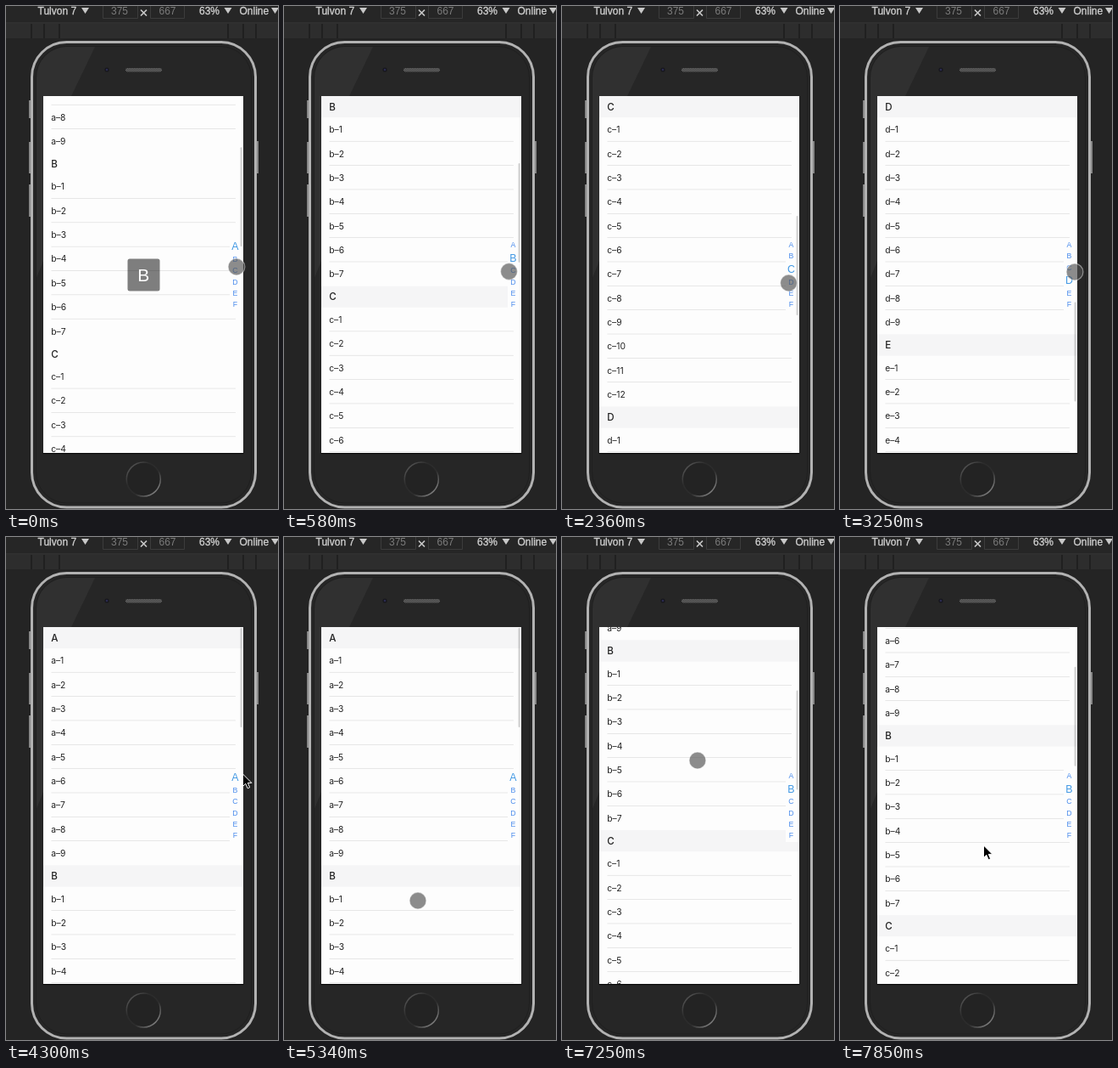
These frames come from a looping animation (321x592 px, 8000 ms). An HTML page:

```html
<!DOCTYPE html>
<html lang="en">
<head>
<meta charset="utf-8">
<title>Index list</title>
<style>
  html, body { margin: 0; width: 100%; height: 100%; overflow: hidden; background: #242424; }
  svg { display: block; }
  .bar text { font: 12px "Liberation Sans", Arial, sans-serif; fill: #d2d2d2; stroke: #d2d2d2; stroke-width: .3px; }
  .bar .dim { fill: #7c7c7c; stroke: none; text-anchor: middle; }
  .bar path { fill: #c8c8c8; }
  .row { font: 10.3px Inter, sans-serif; fill: #222; }
  .head { font: 500 11.6px Inter, sans-serif; fill: #222; }
  .mark { font: 8.8px "Liberation Sans", Arial, sans-serif; fill: #4b8cec; text-anchor: middle; }
  .mark.on { font-size: 12.4px; fill: #4299e4; }
  #letter { font: 21px "Liberation Sans", Arial, sans-serif; fill: #fff; text-anchor: middle; }
</style>
</head>
<body>
<svg width="321" height="592" viewBox="0 0 321 592">
  <defs>
    <linearGradient id="ring" x1="0" y1="0" x2="1" y2="1">
      <stop offset="0" stop-color="#666"/>
      <stop offset=".35" stop-color="#2c2c2c"/>
      <stop offset=".6" stop-color="#2c2c2c"/>
      <stop offset="1" stop-color="#a4a4a4"/>
    </linearGradient>
    <pattern id="mesh" width="2" height="2" patternUnits="userSpaceOnUse">
      <path d="M0 0h2v2h-2z" fill="#3c3c3c"/>
      <path d="M0 0h1v1h-1zM1 1h1v1h-1z" fill="#6a6a6a"/>
    </pattern>
    <clipPath id="body"><rect x="36" y="48" width="253" height="536" rx="36"/></clipPath>
  </defs>

  <rect width="321" height="592" fill="#242424"/>
  <g class="bar">
    <rect width="321" height="20" fill="#262626"/>
    <rect y="19.5" width="321" height="1" fill="#3b3b3b"/>
    <rect y="21" width="321" height="17" fill="#2d2d2d"/>
    <path d="M30 21v17M45 21v17M63 21v17M262 21v17M280 21v17M295 21v17" style="stroke:#1d1d1d;stroke-width:1.5"/>
    <path d="M114.5 -1v15.500h41v-15.500M170.500 -1v15.500h40v-15.500" style="fill:none;stroke:#3c3c3c"/>
    <text x="37.5" y="10">Tulvon 7</text>
    <text class="dim" x="134" y="10">375</text>
    <text class="dim" x="190.5" y="10">667</text>
    <path d="M159 4.500l7 7M166 4.500l-7 7" style="stroke:#c8c8c8;stroke-width:1.7"/>
    <text x="228" y="10">63%</text>
    <text x="275.5" y="10">Online</text>
    <path d="M89 2h9l-4.500 7zM257.500 2h9l-4.500 7zM313 2h9l-4.500 7z"/>
  </g>

  <path d="M27 111h3v21h-3zM27 160h3v37h-3zM27 210h3v38h-3zM295 159h3v38h-3z" fill="#888"/>
  <rect x="30.500" y="42.500" width="264" height="547.500" rx="41" fill="#262626" stroke="#b2b2b2" stroke-width="3"/>
  <rect x="35.500" y="47.500" width="254" height="537.500" rx="36.500" fill="none" stroke="#1f1f1f"/>
  <path d="M36 48H105L77 106H44V300L36 320z" fill="#303030" clip-path="url(#body)"/>
  <circle cx="119" cy="75" r="2.600" fill="#17171d"/>
  <circle cx="119" cy="75" r="1.300" fill="#2b2b50"/>
  <rect x="141" y="73" width="43" height="4.500" rx="2.200" fill="url(#mesh)"/>
  <circle cx="162.300" cy="557" r="20" fill="#232323" stroke="url(#ring)" stroke-width="1.500"/>
  <rect x="43.500" y="526" width="237" height="1.200" fill="#0c0c0c"/>

  <svg x="44" y="106" width="236" height="420">
    <rect width="236" height="420" fill="#fdfdfd"/>
    <g id="list"></g>
    <rect x="220" y="167" width="16" height="86" fill="#fdfdfd"/>
    <g id="marks"></g>
    <rect id="thumb" x="232.500" width="2.200" height="117" rx="1.100" fill-opacity=".17"/>
    <g id="popup">
      <rect x="99.500" y="191.500" width="38" height="38" rx="2.500" fill-opacity=".5"/>
      <text id="letter" x="118.300" y="218"></text>
    </g>
  </svg>

  <circle id="touch" r="9.900" fill="#505050" fill-opacity=".65" stroke="#fff" stroke-opacity=".45" stroke-width="1.200"/>
  <path id="arrow" d="M0 0V14.500L3.300 11.300 5.700 16.800 8.100 15.700 5.800 10.400H10.400z" stroke="#fff"/>
</svg>

<script>
const LOOP = 8000, STEP = 148.2, LEAD = 12, LAST = 53;
const ROW = 28.35, HEAD = 25.2, VIEW = 420;
const NAMES = "ABCDEF", COUNTS = [9, 7, 12, 9, 6, 5];

// A tap on a letter scrolls to its section; a drag moves the list with the pointer. Times in steps.
const TAP_TIME = 3;
const taps = [{ at: -2, to: 1 }, { at: 5, to: 2 }, { at: 16, to: 3 }, { at: 26, to: 0 }];
const drags = [{ from: 36, to: 43 }, { from: 48, to: LAST }];

// Where the pointer rests: arrive, leave, x, y
const stops = [
  [0, 0, 272, 307], [1, 2, 274.5, 312.5], [4, 5, 265.5, 312.5], [8, 8, 281.5, 310],
  [16, 16, 267.5, 326], [22, 22, 277, 313], [26, 27, 270, 284], [29, 30, 279.5, 279],
  [32, 35, 194.5, 141], [36, 36, 158, 428], [42, 42, 149.3, 170.3], [43, 44, 148, 138],
  [LAST, LAST, 169.5, 363]
];

const $ = id => document.getElementById(id);
const clamp = v => Math.min(1, Math.max(0, v));
const easeOut = p => 1 - (1 - p) ** 1.3;
const show = (el, on) => el.setAttribute("visibility", on ? "visible" : "hidden");

function add(parent, tag, attrs, text) {
  const el = document.createElementNS("http://www.w3.org/2000/svg", tag);
  for (const k in attrs) el.setAttribute(k, attrs[k]);
  if (text) el.textContent = text;
  return parent.appendChild(el);
}

// Sections, rows and the side index
const starts = [], bands = [], marks = [];
let total = 0;
[...NAMES].forEach((name, i) => {
  const list = $("list");
  starts.push(total);
  bands.push(add(list, "rect", { y: total, width: 236, height: HEAD, fill: "#f5f5f6" }));
  add(list, "text", { class: "head", x: 9.3, y: total + 16.8 }, name);
  total += HEAD;
  for (let r = 1; r <= COUNTS[i]; r++) {
    add(list, "text", { class: "row", x: 9.2, y: total + 18 }, name.toLowerCase() + "–" + r);
    total += ROW;
    if (r < COUNTS[i])
      add(list, "rect", { x: 9.45, y: total - .63, width: 217.5, height: .63, fill: "#dadada" });
  }
  marks.push(add($("marks"), "text", { x: 226.4 }, name));
});

function pointerAt(n) {
  const i = stops.findIndex(s => s[1] >= n);
  const [arrive, , x, y] = stops[i];
  if (n >= arrive) return { x, y };
  const [, left, px, py] = stops[i - 1];
  const p = (n - left) / (arrive - left);
  return { x: px + (x - px) * p, y: py + (y - py) * p };
}

function scrollAt(n) {
  const tapped = taps.reduce((pos, tap) =>
    pos + (starts[tap.to] - pos) * easeOut(clamp((n - tap.at) / TAP_TIME)), 0);
  return drags.filter(d => n > d.from).reduce((pos, d) =>
    pos + pointerAt(d.from).y - pointerAt(Math.min(n, d.to)).y, tapped);
}

function drawMarks(active) {
  let y = 168.4;
  marks.forEach((mark, i) => {
    const on = i === active, h = on ? 17 : 13.2;
    mark.setAttribute("class", on ? "mark on" : "mark");
    mark.setAttribute("y", y + h / 2 + (on ? 4.4 : 3.1));
    y += h;
  });
}

function draw(n) {
  const scroll = scrollAt(n), { x, y } = pointerAt(n);
  $("list").setAttribute("transform", `translate(0 ${-scroll})`);
  $("thumb").setAttribute("y", 1 + scroll / total * VIEW);

  // The active letter stays put once the first drag ends
  const settled = scrollAt(Math.min(n, drags[0].to));
  drawMarks(starts.filter(s => s <= settled + 1).length - 1);

  const tap = taps.find(t => n > t.at && n < t.at + TAP_TIME);
  show($("popup"), tap);
  $("letter").textContent = tap ? NAMES[tap.to] : "";
  bands.forEach(band => show(band, !tap));

  const arrow = x > 279 || n === LAST;
  show($("arrow"), arrow);
  show($("touch"), !arrow);
  $(arrow ? "arrow" : "touch").setAttribute("transform", `translate(${x} ${y})`);
}

const origin = performance.now();
let shown = -1;
function frame() {
  const t = (performance.now() - origin) % LOOP;
  const n = Math.min(LAST, Math.floor((t + LEAD) / STEP));
  if (n !== shown) draw(shown = n);
  requestAnimationFrame(frame);
}
frame();
</script>
</body>
</html>
```
